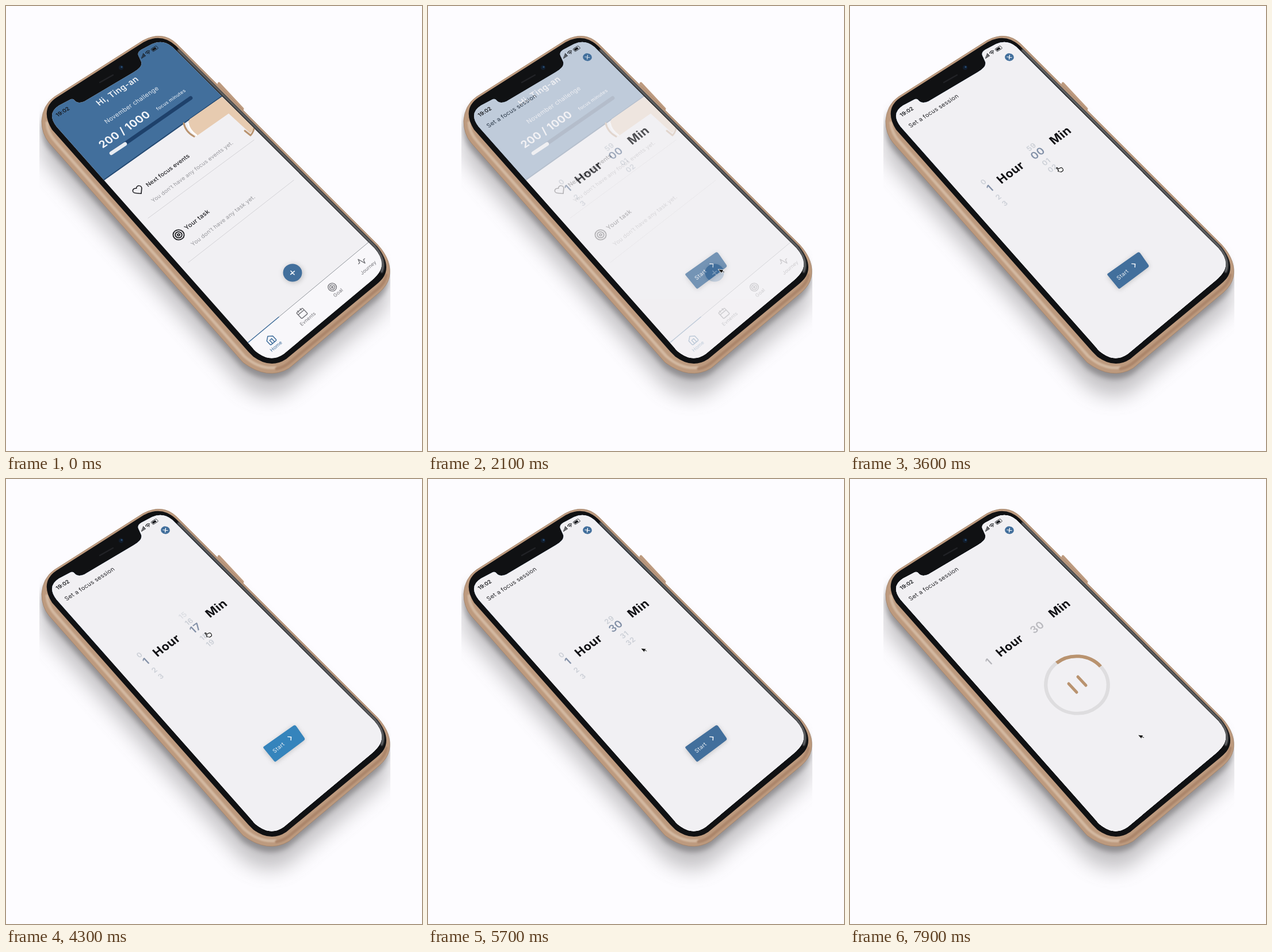
These frames come from a looping animation (723x774 px, 8 s). An HTML page:

```html
<!DOCTYPE html>
<html lang="en">
<head>
<meta charset="utf-8">
<title>Focus timer</title>
<style>
html, body { margin: 0; width: 100%; height: 100%; overflow: hidden; background: #fdfcff; }
svg { display: block; width: 723px; height: 774px; font-family: Inter, Roboto, sans-serif; }
.line { fill: none; stroke-linecap: round; stroke-linejoin: round; }
</style>
</head>
<body>
<svg id="stage" viewBox="0 0 723 774"></svg>
<script>
const BLUE = '#426f9c', INK = '#222226', GREY = '#77777c', TAN = '#b9936f', PAPER = '#f1f0f3';
const $ = id => document.getElementById(id);
const clamp = (v, a = 0, b = 1) => Math.min(b, Math.max(a, v));
const ease = p => p < .5 ? 2 * p * p : 1 - 2 * (1 - p) ** 2;
const easeOut = p => 1 - (1 - p) ** 2;
const span = (t, a, b) => clamp((t - a) / (b - a));

// Local axes of the tilted screen around a stage point
function plane(x, y) {
  const u = x + y - 340;
  const r = -(33 + .015 * u - .000007 * u * u) * Math.PI / 180;
  const d = 47 * Math.PI / 180;
  const m = [Math.cos(r), Math.sin(r), Math.cos(d), Math.sin(d)].map(v => v.toFixed(4));
  return `matrix(${m.join(' ')} ${x} ${y})`;
}
const at = (x, y, body, more = '') => `<g transform="${plane(x, y)}" ${more}>${body}</g>`;
const text = (x, y, size, str, fill, weight = 400, gap = .25) =>
  `<text transform="${plane(x, y)}" font-size="${size}" font-weight="${weight}" letter-spacing="${gap}" fill="${fill}">${str}</text>`;
const line = (d, color, width, more = '') =>
  `<path class="line" d="${d}" stroke="${color}" stroke-width="${width}" ${more}/>`;
// 24-unit icon centred on a point
const icon = (x, y, size, d, color, width = 2) =>
  at(x, y, `<g transform="scale(${size / 24}) translate(-12 -12)">${line(d, color, width)}</g>`);
const ring = r => `M${12 - r} 12a${r} ${r} 0 1 0 ${2 * r} 0a${r} ${r} 0 1 0 ${-2 * r} 0`;
const TARGET = ring(10) + ring(6) + ring(2);
const HEART = 'M20.8 4.6a5.5 5.5 0 0 0-7.8 0L12 5.7l-1-1.1a5.5 5.5 0 0 0-7.8 7.8l1 1L12 21.2l7.8-7.8 1-1a5.5 5.5 0 0 0 0-7.8z';

const BODY = 'M84 158L238 60Q272 42 297 66L646 415Q672 444 666 472Q663 486 648 499L492 630Q455 652 412 620L75 238Q62 222 62 200Q64 172 84 158Z';
const BEZEL = 'M80 215Q58 179 88 159L239 63Q270 46 295 69L645 418Q669 448 657 470Q653 477 643 485L487 614Q460 632 430 610L421 601Z';
const SCREEN = 'M88 210Q70 187 92 173L111 163Q116 160 119 164Q125 171 136 166L222 115Q238 106 235 97L230 86Q228 80 235 76L252 67Q272 57 289 71L640 421Q661 445 648 464Q644 470 636 477L483 605Q462 620 440 605Q432 600 428 594Z';

const phone = `
<g clip-path="url(#drop)">
  <path d="${BODY}" fill="#747275" opacity=".42" transform="translate(-2 40)" filter="url(#wide)"/>
  <path d="${BODY}" fill="#4b494c" opacity=".42" transform="translate(-1 10)" filter="url(#tight)"/>
</g>
${line('M370 135L411 179', '#bd9a7f', 5)}
${line('M125 289L163 331M159 328L193 363', '#ab8a70', 6)}
<path d="${BODY}" fill="#bd9a7e" stroke="#a08068" stroke-width=".8"/>
${line('M71 203Q72 221 87 237L414 609Q440 632 468 629', '#d3b9a2', 5, 'filter="url(#soft)"')}
${line('M470 631Q482 629 493 620L646 492Q659 481 661 468', '#ab856a', 5, 'filter="url(#soft)"')}
<path d="${BEZEL}" fill="#101113"/>
${line('M300 77L641 418Q661 442 653 462', '#66686a', 4, 'filter="url(#soft)"')}
${line('M163 133L186 120', '#222327', 2.5)}
<circle cx="200" cy="107" r="4" fill="#111d2d"/><circle cx="201" cy="106" r="1.6" fill="#2b527b"/>`;

const home = `
<rect width="723" height="774" fill="${PAPER}"/>
<path d="M0 0H430V118L375 157 170 303 0 424Z" fill="${BLUE}"/>
${line('M168 304L378 155', '#244a73', 2)}
<path d="M319 197L375 158 430 207Q430 217 424 221L387 187 330 227Q317 214 316 204Z" fill="#e7cbb0"/>
${line('M316 203Q318 216 331 225', '#fff', 3)}
${line('M309 204Q312 219 327 227M432 207Q431 219 425 225L415 217', TAN, 3)}
${text(162, 174, 14.5, 'Hi, Ting-an', '#eef2f7', 600, .5)}
${text(175, 205, 10.7, 'November challenge', '#e3eaf2', 400, .3)}
${text(168, 248, 18.5, '200 / 1000', '#f3f5f9', 700, .4)}
${text(264, 182, 8.3, 'focus minutes', '#e3eaf2', 500, .3)}
${line('M183 256L321 160', '#1e416b', 6.5)}
${line('M183 256L207 240', '#e8ecf2', 6.5)}
${icon(230, 321, 19, HEART, INK)}
${text(247, 315, 10.2, 'Next focus events', INK, 500, .15)}
${text(256, 342, 9.5, 'You don’t have any focus events yet.', '#97979c')}
${line('M247 369L431 233M317 446L500 303', '#d3d2d6', 1)}
${icon(300, 398, 22, TARGET, INK)}
${text(314, 390, 10.9, 'Your task', INK, 500, .3)}
${text(325, 418, 9.9, 'You don’t have any task yet.', '#97979c')}
${at(498, 464, `<circle r="16.5" cy="2" fill="#777" opacity=".4" filter="url(#tight)"/><circle r="16" fill="${BLUE}"/>`)}
${at(498, 464, line('M-4.5 0H4.5M0-4.5V4.5', '#fff', 1.4))}
<path d="M420 586L630 411 723 500V774H500Z" fill="#f8f7fa"/>
${line('M420 586L630 411', '#8f949a', 1)}
${line('M420 586L474 541', BLUE, 1.5)}
${icon(460, 580, 18, 'M3 9l9-7 9 7v11a2 2 0 0 1-2 2H5a2 2 0 0 1-2-2zM9 22V12h6v10', BLUE)}
${icon(514, 534, 18, 'M5 4h14a2 2 0 0 1 2 2v14a2 2 0 0 1-2 2H5a2 2 0 0 1-2-2V6a2 2 0 0 1 2-2zM16 2v4M8 2v4M3 10h18', GREY)}
${icon(567, 489, 17, TARGET, GREY)}
${icon(618, 444, 17, 'M22 12h-4l-3 9L9 3l-3 9H2', GREY)}
${text(462, 602, 8.6, 'Home', BLUE, 400, .1)}
${text(514, 557, 8.5, 'Evnents', GREY, 400, .1)}
${text(572, 507, 8.6, 'Goal', GREY, 400, .1)}
${text(619, 468, 8.5, 'Journey', GREY, 400, 0)}`;

const heading = `
<rect width="723" height="774" fill="${PAPER}"/>
${text(105.5, 212, 10.3, 'Set a focus session', INK, 400, .3)}
${at(277, 89, `<circle r="7.3" fill="${BLUE}"/>` + line('M-2.6-2.6L2.6 2.6M2.6-2.6L-2.6 2.6', '#fff', 1.3))}`;
const units = shift => text(263 - shift, 310, 20.6, 'Hour', '#101014', 700, .6) + text(354.5 - shift, 242, 20.6, 'Min', '#101014', 700, .6);

const picker = `${heading}${units(0)}
<g id="wheels"></g>
<g transform="translate(.5 1)">
<path d="M449 467L498 430Q501 428 503 430L518 450Q520 452 518 454L470 491Q467 493 465 490L448 470Z" fill="#777" opacity=".4" filter="url(#tight)"/>
<path id="start" d="M448 464L499 428Q502 426 504 429L518 449Q520 452 517 454L469 490Q467 492 465 489L447 467Q446 465 448 464Z"/>
</g>
${text(467, 477, 9.5, 'Start', '#eef2f6', 400, .4)}
${at(494, 450, line('M-2-4L2 0L-2 4', '#fff', 1.4))}`;

const timer = `${heading}${units(1.5)}
${glyph(241, 318, '1', 18, '#b4b4b9')}${glyph(325, 258, '30', 18, '#b9b9be')}
${at(394.5, 358, `<circle r="52" fill="none" stroke="#dedddf" stroke-width="6"/>
<path d="M0-52A52 52 0 0 1 52 0" fill="none" stroke="${TAN}" stroke-width="6"/>`)}
${line('M380 356L394 371M396 344L410 359', TAN, 5)}`;

const status = at(236, 91.5, `
<path d="M0 0v-2h1.5v2zM2.3 0v-3.5h1.5v3.5zM4.6 0v-5h1.5v5zM6.9 0v-6.5h1.5v6.5z"/>
${line('M11.5-4.2q4-3.6 8 0M13.2-2.4q2.3-2 4.6 0', '#15171b', 1.2)}<circle cx="15.5" cy="-.7" r=".9"/>
<rect x="23" y="-5.5" width="11" height="6" rx="1.6" fill="none" stroke="#15171b" stroke-width=".8"/>
<rect x="24.2" y="-4.3" width="7" height="3.6" rx=".6"/>`, 'fill="#15171b"')
  + text(90, 193, 9.3, '19:02', '#15171b', 600, .1);

const cursor = `
<g id="arrow"><path d="M0 0V11L2.6 8.7 4.4 12.5 6.2 11.7 4.5 8H8Z" transform="scale(.9)" fill="#111" stroke="#fff" stroke-width=".9"/></g>
<g id="hand"><path d="M-1 1Q0-1 1 1V5Q2.6 4 3.4 5.2Q5 4.4 5.8 5.8Q7.6 5.4 7.6 7.2V9.5Q7 12 5.6 13H0.6Q-1 10.4-3 8.4Q-3 6.6-1 7.6Z" transform="scale(.85)" fill="#fff" stroke="#111" stroke-width="1.3" stroke-linejoin="round"/></g>`;

$('stage').innerHTML = `
<defs>
  <clipPath id="screen"><path d="${SCREEN}"/></clipPath>
  <clipPath id="drop"><rect x="58" y="150" width="610" height="624"/></clipPath>
  <filter id="wide" x="-20%" y="-20%" width="140%" height="140%"><feGaussianBlur stdDeviation="17"/></filter>
  <filter id="tight" x="-30%" y="-30%" width="160%" height="160%"><feGaussianBlur stdDeviation="4"/></filter>
  <filter id="soft"><feGaussianBlur stdDeviation="1"/></filter>
</defs>
${phone}
<g clip-path="url(#screen)">
  <g id="home">${home}</g><g id="picker">${picker}</g><g id="timer">${timer}</g>${status}
</g>
<g id="cursor">${cursor}</g>`;

function glyph(x, y, str, size, fill, opacity = 1) {
  return `<text transform="${plane(x, y)}" y="${size * .36}" text-anchor="middle" font-size="${size}" font-weight="600" letter-spacing=".4" fill="${fill}" opacity="${opacity}">${str}</text>`;
}

// Column of numbers: value sits at (x, y), the chosen one is large
function wheel(x, y, value, chosen, label) {
  let out = '';
  for (let k = Math.floor(value) - 2; k <= value + 3; k++) {
    const d = k - value, big = k === chosen;
    const shift = 11 * d + 4 * clamp(k - chosen);
    const seen = clamp(2 - Math.abs(d - .5) + .5);
    if (seen > 0) out += glyph(x + shift, y + shift, label(k), big ? 18 : 12.5, big ? '#8290a7' : '#cbcfd6', clamp(seen * 2));
  }
  return out;
}

const PATH = [
  [1100, 549, 490], [1450, 509, 452], [1900, 509, 452], [2300, 499, 464], [2700, 499, 464],
  [3300, 359, 281], [3700, 359, 281], [4900, 333, 254], [5400, 333, 254],
  [6300, 497, 436], [7000, 497, 436], [7500, 500, 445], [8000, 500, 445]];
const GRIPS = [[1300, 1900], [3200, 4900], [6100, 7000]];

function pointer(t) {
  const i = clamp(PATH.findIndex(p => p[0] > t), 1, PATH.length - 1);
  const [a, b] = [PATH[i - 1], PATH[i]];
  const p = ease(span(t, a[0], b[0]));
  return [a[1] + (b[1] - a[1]) * p, a[2] + (b[2] - a[2]) * p];
}

function draw(t) {
  $('picker').setAttribute('opacity', easeOut(span(t, 1750, 2500)));
  $('timer').setAttribute('opacity', easeOut(span(t, 6850, 7400)));

  // The minutes run one step too far, then snap back
  const minutes = 31 * ease(span(t, 3650, 4900)) - ease(span(t, 5100, 5400));
  const two = k => String((k + 60) % 60).padStart(2, '0');
  $('wheels').innerHTML =
    wheel(243, 317, 1, 1, k => k < 0 ? '' : k) +
    wheel(326, 256, minutes, Math.min(30, Math.round(minutes)), two);
  $('start').setAttribute('fill', t >= 4100 && t < 5500 ? '#3584bc' : BLUE);

  const hand = GRIPS.some(([a, b]) => t >= a && t < b);
  $('cursor').setAttribute('transform', plane(...pointer(t)));
  $('cursor').setAttribute('visibility', t < 1100 ? 'hidden' : 'visible');
  $('hand').setAttribute('opacity', hand ? 1 : 0);
  $('arrow').setAttribute('opacity', hand ? 0 : 1);
}

const begin = performance.now();
function tick() {
  const t = (performance.now() - begin) % 8000;
  draw(Math.floor(t / 100) * 100);
  requestAnimationFrame(tick);
}
tick();
</script>
</body>
</html>
```
